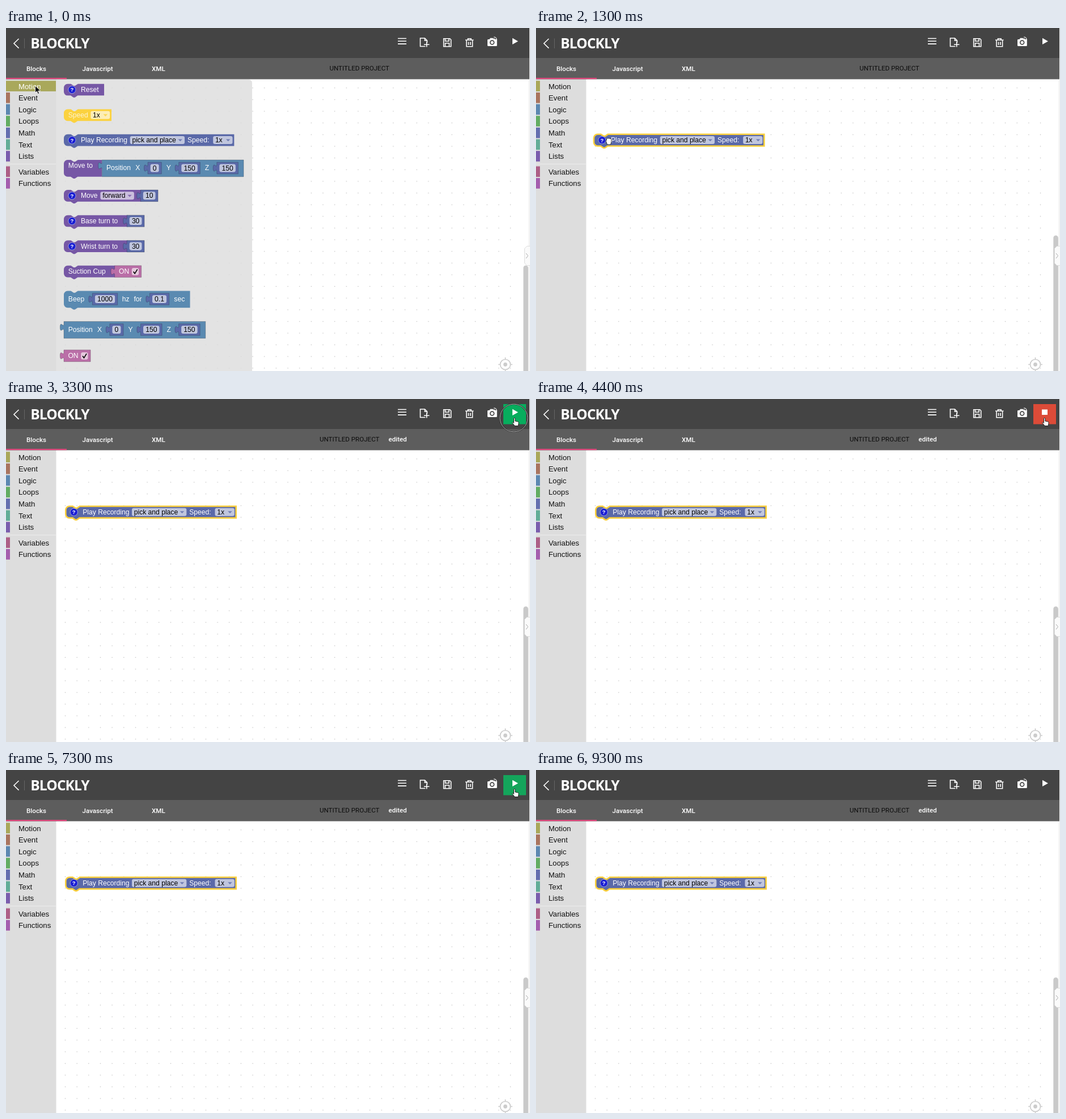
Animation of 924 by 606 pixels, one loop 9.4 s. Source, as an HTML page:

```html
<!DOCTYPE html>
<html lang="en">
<head>
<meta charset="utf-8">
<title>Blockly workspace</title>
<style>
html, body { margin: 0; width: 100%; height: 100%; overflow: hidden; background: #fff; }
svg { display: block; width: 924px; height: 606px; }
text { white-space: pre; }
.block text { font: 14.67px "Liberation Sans", Arial, sans-serif; fill: #fff; }
.block .dark { fill: #000; }
.block .mark { font-weight: 700; font-size: 11.5px; text-anchor: middle; }
.block .num { fill: #000; text-anchor: middle; }
.menu text { font: 13.22px "Liberation Sans", Arial, sans-serif; fill: #111; }
.menu .on text { fill: #fff; }
.tabs text { font: 500 11.6px Roboto, sans-serif; fill: #fff; }
.tabs .project { font-weight: 400; fill: #0c0c0c; }
.title { font: 700 24.5px "Open Sans", "Noto Sans", sans-serif; letter-spacing: -.9px; fill: #fff; }
.line { fill: none; stroke: #fff; stroke-width: 1.6; }
.cursor path { stroke-width: .9; stroke-linejoin: round; }
</style>
</head>
<body>
<svg viewBox="0 0 924 606">
  <defs>
    <pattern id="dots" x="94.1" y="95.5" width="20.66" height="20.63" patternUnits="userSpaceOnUse">
      <rect x="9.7" y="9.7" width="1.3" height="1.3" fill="#bbb"/>
    </pattern>
  </defs>
  <rect width="924" height="606" fill="#fff"/>
  <rect x="88" y="91" width="818" height="515" fill="url(#dots)"/>

  <g fill="none" stroke="#ccc" stroke-width="1.7">
    <circle cx="880.5" cy="594.5" r="9"/>
    <path d="M880.5 582v4M880.5 603v4M868 594.5h4M889 594.5h4"/>
    <circle cx="880.5" cy="594.5" r="3.4" fill="#ccc" stroke="none"/>
  </g>
  <rect id="scroll" x="912.3" width="8.6" height="260" rx="4.3" fill="#c9c9c9"/>
  <path d="M922.5 91V606" stroke="#e4e4e4"/>
  <path d="M924 385.5h-5.5l-4 4v26l4 4h5.5" fill="#fafafa" stroke="#ddd"/>
  <path d="M917 398l3.5 4.500-3.5 4.500" fill="none" stroke="#aaa"/>

  <g id="flyout">
    <path d="M88 91H428a6 6 0 0 1 6 6V606H88z" fill="#ddd" opacity=".82"/>
  </g>
  <g class="menu" id="menu"><rect y="90" width="88.500" height="516" fill="#ddd"/></g>
  <g id="play"></g>

  <g class="tabs">
    <rect y="53" width="923" height="37.500" fill="#5d5d5d"/>
    <rect y="88" width="107" height="2.300" fill="#e0477c"/>
    <text x="36" y="76">Blocks</text>
    <text x="134.500" y="76">Javascript</text>
    <text x="257" y="76">XML</text>
    <text class="project" id="project" y="75.300">UNTITLED PROJECT</text>
    <text id="edited" x="674.500" y="75.300">edited</text>
  </g>

  <rect width="923" height="53" fill="#444"/>
  <path class="line" d="M22.500 19l-8.500 8.300 8.500 8.300"/>
  <path d="M32.500 18.500v17.500" stroke="#666"/>
  <text class="title" x="43.300" y="36">BLOCKLY</text>
  <g class="line">
    <path d="M691 18.500h15M691 23.300h15M691 28.100h15"/>
    <path d="M739.500 32.500h-9V18h8l4 4v4M738.500 18v4.300h4M737 29.200h9.500M741.800 24.500v9"/>
    <path d="M771.700 18.800h11l2 2v11.900h-13zM774.500 19v4.200h6.500v-4.200M774.500 32.500v-5.800h7v5.800"/>
    <path d="M810 21.300h14.500M814.500 21v-2.200h5.500v2.200M812 21.300v11.400h10.600V21.300M815.500 24.500v5.500M819 24.500v5.500"/>
    <path d="M859.500 18.500q2.500 0 3 3M860 16q5 0 5.300 5" stroke-width="1.200"/>
  </g>
  <path d="M850.500 20h2l1.500-2.300h4.500l1.500 2.300h4.500q1.300 0 1.300 1.300v9.400q0 1.300-1.300 1.300h-14q-1.500 0-1.500-1.300v-9.400q0-1.300 1.500-1.300z" fill="#fff"/>
  <circle cx="857.200" cy="25.500" r="3.400" fill="#fff" stroke="#444" stroke-width="1.700"/>
  <rect id="button" x="877" y="9" width="40" height="35.500"/>
  <path id="symbol" fill="#fff"/>
  <g id="ring" fill="none">
    <circle cx="895.500" cy="33.500" stroke="#222" stroke-width="2.200"/>
    <circle cx="895.500" cy="33.500" stroke="#ddd" stroke-width=".8"/>
  </g>

  <g class="cursor" id="cursor">
    <path id="arrow" fill="#000" stroke="#fff" d="M0 0v12.500l2.900-2.700 2 4.700 2.200-.9-2-4.600h4.100z"/>
    <path id="open" fill="#fff" stroke="#222" d="M-5.500-.8q1-.7 1.800.4l.8 1.200-1.200-4.800a1 1 0 0 1 2-.5l.6 2.200V-6a1 1 0 0 1 2 0v3.500l.8-3a1 1 0 0 1 2 .5l-.5 3 .8-1.400a1 1 0 0 1 1.800.8L4.500 3 3.300 7h-6L-4 4-6 1q-.4-1.100.5-1.800z"/>
    <path id="closed" fill="#fff" stroke="#222" d="M-4.500 1.200q-.8-2 1-2v-2.500q1-1.700 2.200-.4Q-.3-5.100.8-3.700 2-4.800 2.900-3.300q1.700-.7 2 .8V2L3.600 7h-6L-3.500 4z"/>
    <path id="hand" fill="#fff" stroke="#111" d="M0 1.200a1.200 1.200 0 0 1 2.400 0v4.300l4.800 1q1.600.4 1.400 2L8 12.200 7.400 14H1.800L-2.800 8.600q.3-1.600 1.600-.8L0 8.900z"/>
  </g>
</svg>
<script>
const $ = id => document.getElementById(id);
const PURPLE = '#7657a5', MATH = '#5a69a8', BLUE = '#5a8ab1', PINK = '#ba6ea7', YELLOW = '#fbd23f';
const SCALE = .826;

// Block parts, in Blockly's own units
const text = (x, s, y = 17.3, cls = '') => `<text x="${x}" y="${y}" class="${cls}">${s}</text>`;
const pill = (x, y, w, h = 17) => `<rect x="${x}" y="${y}" width="${w}" height="${h}" rx="4" fill="#fff" opacity=".62"/>`;
const shape = (d, color, extra = '') => `<path d="${d}" fill="${color}" ${extra}/>`;
const EDGE = 'stroke="#000" stroke-opacity=".22" stroke-width="1.2"';

const stackPath = (w, h) =>
  `M0 8A8 8 0 0 1 8 0H15l6 4h3l6-4H${w}V${h}H29.5l-6 4h-3l-6-4H8a8 8 0 0 1-8-8z`;
const valuePath = (x, y, w, h) =>
  `M${x} ${y}h${w}v${h}h${-w}V${y + 20}c0-10-8 8-8-7.500s8 2.500 8-7.500z`;

const stack = (w, h, color, extra) => shape(stackPath(w, h), color, extra);
const value = (x, y, w, h, color, extra = EDGE) => shape(valuePath(x, y, w, h), color, extra);
const help = () => `<circle cx="17.500" cy="12.500" r="8" fill="#1a1fd4" stroke="#b9bde6" stroke-width=".9"/>`
  + text(17.5, '?', 16.6, 'mark');

const number = (cx, s, y = 0) => {
  const field = s.replace('.', '').length * 8.16 + (s.includes('.') ? 4 : 0) + 10;
  const w = field + 11;
  return value(cx - w / 2, y, w, 25, MATH) + pill(cx - field / 2, y + 4, field)
    + text(cx, s, y + 17.5, 'num');
};
const dropdown = (x, w, s, color) => pill(x, 3.8, w) + text(x + 4.5, s, 17.3, 'dark')
  + shape(`M${x + w - 14} 10.500h9l-4.500 4.700z`, color, 'opacity=".8"');
const toggle = x => value(x, 0, 57, 25, PINK) + text(x + 9, 'ON') + pill(x + 36.500, 5, 15, 15.500)
  + `<path d="M${x + 40} 13l3 4 5.500-9" fill="none" stroke="#000" stroke-width="2"/>`;
const position = () => value(0, 0, 302.400, 36, BLUE) + text(9.300, 'Position', 22)
  + text(71.300, 'X', 22) + number(112.500, '0', 5)
  + text(137.500, 'Y', 22) + number(186.800, '150', 5)
  + text(219.800, 'Z', 22) + number(268, '150', 5);

const block = (x, y, body) =>
  `<g class="block" transform="translate(${x} ${y}) scale(${SCALE})">${body}</g>`;
const turn = s => stack(136, 25, PURPLE) + help() + text(36.300, s) + number(153.300, '30');

$('flyout').innerHTML += [
  [98.700, stack(86, 25, PURPLE) + help() + text(36.300, 'Reset')],
  [143.600, stack(101.700, 25, YELLOW) + `<g opacity=".75">${text(9.300, 'Speed')}</g>` + dropdown(57.300, 41, '1x', YELLOW)],
  [233, stack(81, 36, PURPLE) + text(9.500, 'Move to', 16.800) + `<g transform="translate(81.400)">${position()}</g>`],
  [286, stack(165, 25, PURPLE) + help() + text(36.300, 'Move') + dropdown(78, 72, 'forward', PURPLE) + number(182.400, '10')],
  [330.700, turn('Base turn to')],
  [375.300, turn('Wrist turn to')],
  [419.800, stack(109, 25, PURPLE) + text(9.300, 'Suction Cup') + toggle(108.500)],
  [464.500, stack(269.400, 36, BLUE) + text(9.500, 'Beep', 22) + number(87.800, '1000', 5) + text(124.500, 'hz', 22)
    + text(149.500, 'for', 22) + number(204, '0.1', 5) + text(235.300, 'sec', 22)],
  [518.500, position()],
  [568.800, toggle(0)]
].map(([y, body]) => block(102, y, body)).join('');

$('play').innerHTML = block(102, 187.800, stack(363.600, 25, MATH, 'id="outline" stroke="#fbcf3a"') + help()
  + text(36.300, 'Play Recording') + dropdown(141.300, 116.600, 'pick and place', MATH)
  + text(263.800, 'Speed:') + dropdown(318.600, 41.600, '1x', MATH));

$('menu').innerHTML += [
  ['Motion', '#a9a85b'], ['Event', '#a9745f'], ['Logic', '#5c88b2'], ['Loops', '#62ad64'],
  ['Math', '#636fb0'], ['Text', '#62ad98'], ['Lists', '#7a5dae'],
  ['Variables', '#ad5f88'], ['Functions', '#a45dae']
].map(([name, color], i) => {
  const y = 93.300 + i * 20.650 + (i > 6 ? 6.600 : 0);
  return `<g><rect y="${y}" width="7" height="18.600" fill="${color}"/><text x="22" y="${y + 14.200}">${name}</text></g>`;
}).join('') + '<path d="M0 240.300h88" stroke="#eee"/>';
const motionRow = $('menu').querySelector('g');

// Timeline
const LOOP = 9400, STEP = 100;
const pointer = [[100, 51.500, 102], [600, 120, 195], [900, 120, 195], [1300, 128, 199],
  [1500, 131.300, 200.700], [1800, 131.300, 200.700], [2700, 895.500, 33.500]];
const ease = p => p * p * (3 - 2 * p);

function along(keys, t) {
  const i = keys.findIndex(k => k[0] > t);
  if (i === 0) return keys[0].slice(1);
  if (i < 0) return keys[keys.length - 1].slice(1);
  const a = keys[i - 1], b = keys[i], p = ease((t - a[0]) / (b[0] - a[0]));
  return [a[1] + (b[1] - a[1]) * p, a[2] + (b[2] - a[2]) * p];
}
const show = (id, on) => $(id).style.display = on ? '' : 'none';
const within = (t, a, b) => t >= a && t < b;

function draw(t) {
  const menuOpen = t < 1200, edited = t >= 1600;
  show('flyout', menuOpen);
  motionRow.setAttribute('class', menuOpen ? 'on' : '');
  motionRow.firstChild.setAttribute('width', menuOpen ? 88 : 7);
  const top = menuOpen ? 419.500 : 366.500;
  $('scroll').setAttribute('y', top);
  $('scroll').setAttribute('height', 620 - top);

  const drag = ease(Math.min(1, Math.max(0, (t - 1300) / 200)));
  $('play').setAttribute('transform', `translate(${3.300 * drag} ${1.700 * drag})`);
  $('outline').setAttribute('stroke-width', t >= 600 ? 3.200 : 0);

  show('edited', edited);
  $('project').setAttribute('x', edited ? 553 : 570.500);

  const running = within(t, 3500, 7300);
  show('button', within(t, 2700, 8600));
  $('button').setAttribute('fill', running ? '#dc4b38' : t < 7300 ? '#07ad5d' : '#14a55b');
  $('symbol').setAttribute('d', running ? 'M892 18.500h10v9.500h-10z' : 'M893 17.800l10 5.600-10 5.600z');

  const press = within(t, 3200, 3400) ? t - 3200 : within(t, 7100, 7300) ? t - 7100 : -1;
  show('ring', press >= 0);
  for (const c of $('ring').children) c.setAttribute('r', 19 + Math.max(0, press) * .055);

  const kind = t < 500 ? 'arrow' : t < 1000 ? 'open' : t < 1600 ? 'closed'
    : t < 1900 ? 'open' : t < 2700 ? 'arrow' : 'hand';
  for (const id of ['arrow', 'open', 'closed', 'hand']) show(id, id === kind);
  show('cursor', t < 8600);
  $('cursor').setAttribute('transform', `translate(${along(pointer, t)})`);
}

let start;
function tick(now) {
  start ??= now;
  draw(Math.floor((now - start) % LOOP / STEP) * STEP);
  requestAnimationFrame(tick);
}
draw(0);
requestAnimationFrame(tick);
</script>
</body>
</html>
```
